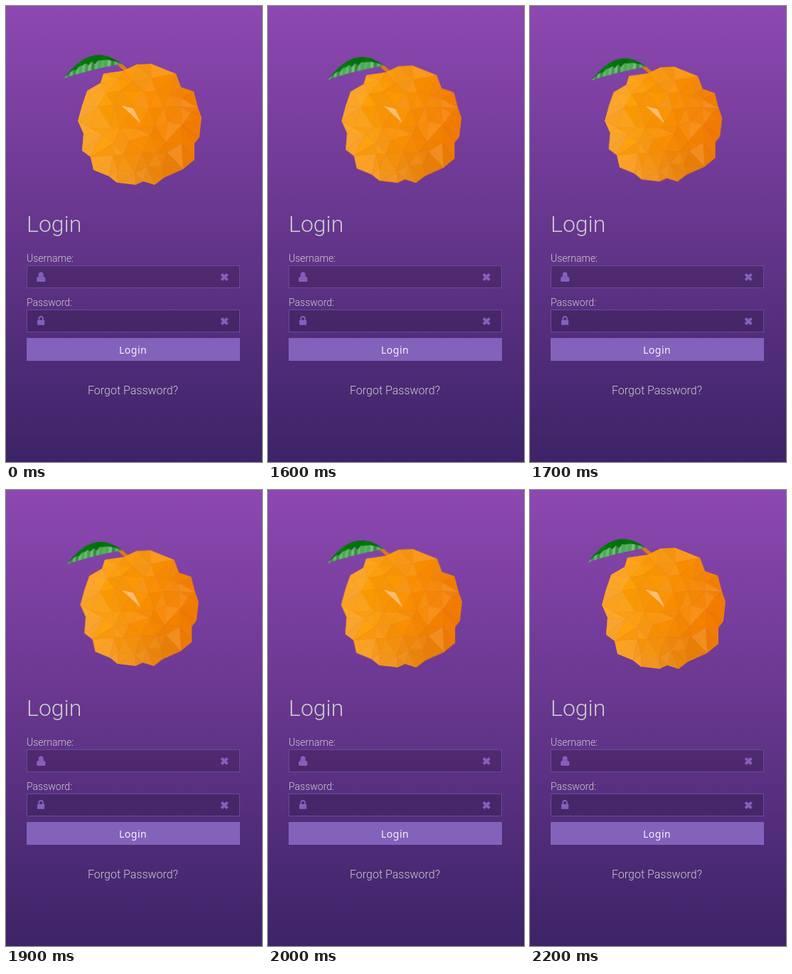
An HTML page that plays this animation: 360x640 px, repeating every 3.8 s.

```html
<!DOCTYPE html>
<html lang="en">
<head>
<meta charset="utf-8">
<title>Login</title>
<style>
  html, body { margin: 0; width: 100%; height: 100%; overflow: hidden; }
  svg { display: block; width: 360px; height: 640px; }
  p { position: absolute; left: 29px; margin: 0; white-space: nowrap;
      font: 300 14px Roboto, sans-serif; color: #ccc; }
  p.title { top: 287px; font-size: 32px; }
  p.button { top: 473px; left: 159px; font: 14px 'Noto Sans', sans-serif;
             letter-spacing: .5px; color: #f5f2f9; }
  p.link { top: 530px; left: 115px; font-size: 16px; }
  .field { fill: #000; fill-opacity: .17; stroke: #6c489e; }
  .icon { fill: #8361bb; }
  .line { fill: none; stroke: #8361bb; }
  #fruit { transform-origin: 180px 160px; }
</style>
</head>
<body>
<svg viewBox="0 0 360 640">
  <defs>
    <linearGradient id="sky" x1="0" y1="0" x2="0" y2="1">
      <stop offset="0" stop-color="#8d48b1"/>
      <stop offset="1" stop-color="#3d2367"/>
    </linearGradient>
    <g id="box">
      <rect class="field" x="29.5" y="364.5" width="299" height="31"/>
      <path class="line" stroke-width="4" d="M303.1 376.4l8.3 8.3m0-8.3l-8.3 8.3"/>
    </g>
  </defs>
  <rect width="360" height="640" fill="url(#sky)"/>
  <g id="fruit"></g>

  <use href="#box"/>
  <g class="icon">
    <path d="M43 384.4q0-4.6 3.2-4.8q2.9 2.2 6 0q3.3 .2 3.3 4.8q0 2.6-2.5 2.6h-7.5q-2.5 0-2.5-2.6z"/>
    <ellipse cx="49.2" cy="377.2" rx="3.4" ry="3.6"/>
  </g>
  <use href="#box" y="62"/>
  <rect class="icon" x="44" y="440.7" width="10.2" height="7" rx=".8"/>
  <path class="line" stroke-width="1.8" d="M46.3 441v-2.2a2.8 2.8 0 0 1 5.6 0v2.2"/>
  <rect x="29" y="466" width="300" height="32" fill="#8362bb"/>
</svg>
<p class="title">Login</p>
<p style="top: 346px">Username:</p>
<p style="top: 408px">Password:</p>
<p class="button">Login</p>
<p class="link">Forgot Password?</p>
<script>
const fruit = document.getElementById('fruit');

function add(parent, tag, attrs) {
  const el = document.createElementNS('http://www.w3.org/2000/svg', tag);
  for (const key in attrs) el.setAttribute(key, attrs[key]);
  parent.append(el);
  return el;
}

function facet(parent, points, color) {
  add(parent, 'polygon', { points: points.join(' '), fill: color, stroke: color, 'stroke-width': .5 });
}

let seed = 7;
function random() {
  seed = seed * 16807 % 2147483647;
  return seed / 2147483647;
}
const jitter = size => (random() - .5) * size;
const clamp = v => Math.max(0, Math.min(1, v));
const mix = (a, b, t) => a.map((v, i) => v + (b[i] - v) * t);

// Delaunay triangles: keep each triple whose circumcircle holds no other point
function triangulate(pts) {
  const out = [], n = pts.length;
  for (let i = 0; i < n; i++) for (let j = i + 1; j < n; j++) for (let k = j + 1; k < n; k++) {
    const [ax, ay] = pts[i];
    const bx = pts[j][0] - ax, by = pts[j][1] - ay;
    const cx = pts[k][0] - ax, cy = pts[k][1] - ay;
    const d = 2 * (bx * cy - by * cx);
    if (Math.abs(d) < 1e-6) continue;
    const b = bx * bx + by * by, c = cx * cx + cy * cy;
    const ux = (cy * b - by * c) / d, uy = (bx * c - cx * b) / d;
    const r = ux * ux + uy * uy - 1e-6;
    if (pts.every(([x, y]) => (x - ax - ux) ** 2 + (y - ay - uy) ** 2 >= r))
      out.push([pts[i], pts[j], pts[k]]);
  }
  return out;
}

// Bright on the left, deeper to the lower right, pale along the left and bottom rim
function peel(dx, dy) {
  const depth = clamp(.35 + .5 * dx + .12 * dy);
  const rim = clamp(Math.hypot(dx, dy) * 2.2 - 1.3) * clamp(.3 - dx + .3 * dy);
  const shadow = clamp(dy * 1.1 - .25) * clamp(dx + .5);
  let color = mix([255, 162, 0], [240, 114, 0], depth);
  color = mix(color, [255, 180, 95], rim * .6);
  color = mix(color, [208, 118, 14], shadow * .7);
  const light = random() ** 3 * .28;
  return mix(mix(color, [255, 186, 105], light), [214, 108, 0], random() * .18);
}

function drawOrange() {
  const [cx, cy, radius] = [188, 166, 86];
  const outline = ('137,95 165,91 184,82 204,81 239,95 246,114 264,120 270,143 275,157 ' +
    '272,184 265,193 265,216 249,229 222,241 209,251 193,246 182,251 156,248 145,239 ' +
    '123,230 119,212 107,203 109,179 101,161 107,139 114,119 133,108').split(' ');
  const pts = outline.map(p => p.split(',').map(Number));
  const step = 21;
  for (let row = -3; row <= 3; row++) for (let col = -4; col <= 4; col++) {
    const x = (col + row % 2 / 2) * step + jitter(13);
    const y = row * step + jitter(13);
    if (Math.hypot(x, y) < radius - 12) pts.push([cx + x, cy + y]);
  }
  add(add(fruit, 'clipPath', { id: 'rind' }), 'polygon', { points: outline.join(' ') });
  const group = add(fruit, 'g', { 'clip-path': 'url(#rind)' });
  for (const tri of triangulate(pts)) {
    const [x, y] = [0, 1].map(i => (tri[0][i] + tri[1][i] + tri[2][i]) / 3);
    const color = peel((x - cx) / radius, (y - cy) / radius);
    facet(group, tri, `rgb(${color.map(Math.round)})`);
  }
  facet(group, ['163,140', '179,144', '189,164'], '#ffbd73');
}

// Dark facets hang from the upper edge, light ones rise from the lower edge
function drawLeaf() {
  const tip = [82, 101], end = [162, 81], count = 9;
  const edge = (ctrl, t) => mix(mix(tip, ctrl, t), mix(ctrl, end, t), t);
  const top = t => edge([121, 49], t), bottom = t => edge([118, 89], t);
  const green = (sat, light) => `hsl(${125 + jitter(8)} ${sat}% ${light + jitter(light * .3)}%)`;
  const middle = t => mix(top(t), bottom(t), .5 + jitter(.35));
  let mid = tip;
  for (let i = 0; i < count; i++) {
    const a = i / count, b = (i + 1) / count, half = (a + b) / 2;
    const next = i < count - 1 ? middle(b) : end;
    const peak = mix(top(half), bottom(half), .4);
    facet(fruit, [top(a), top(b), next, peak, mid], green(100, 23));
    facet(fruit, [mid, peak, bottom(half), bottom(a)], green(36, 54));
    facet(fruit, [peak, next, bottom(b), bottom(half)], green(42, 43));
    mid = next;
  }
}

add(fruit, 'polygon', { points: '156,82 162,80.5 173,90 167,92', fill: '#d97a17' });
drawLeaf();
drawOrange();

// One shrinking pulse per loop, shown at ten steps a second
const loop = 3800, tick = 100, start = 1400, length = 760, depth = .057;
const frames = [];
for (let t = 0; t <= loop; t += tick) {
  const scale = 1 - depth * Math.sin(Math.PI * clamp((t - start) / length)) ** 2;
  frames.push({ offset: t / loop, transform: `scale(${scale})`, easing: 'steps(1, end)' });
}
fruit.animate(frames, { duration: loop, iterations: Infinity });
</script>
</body>
</html>
```
